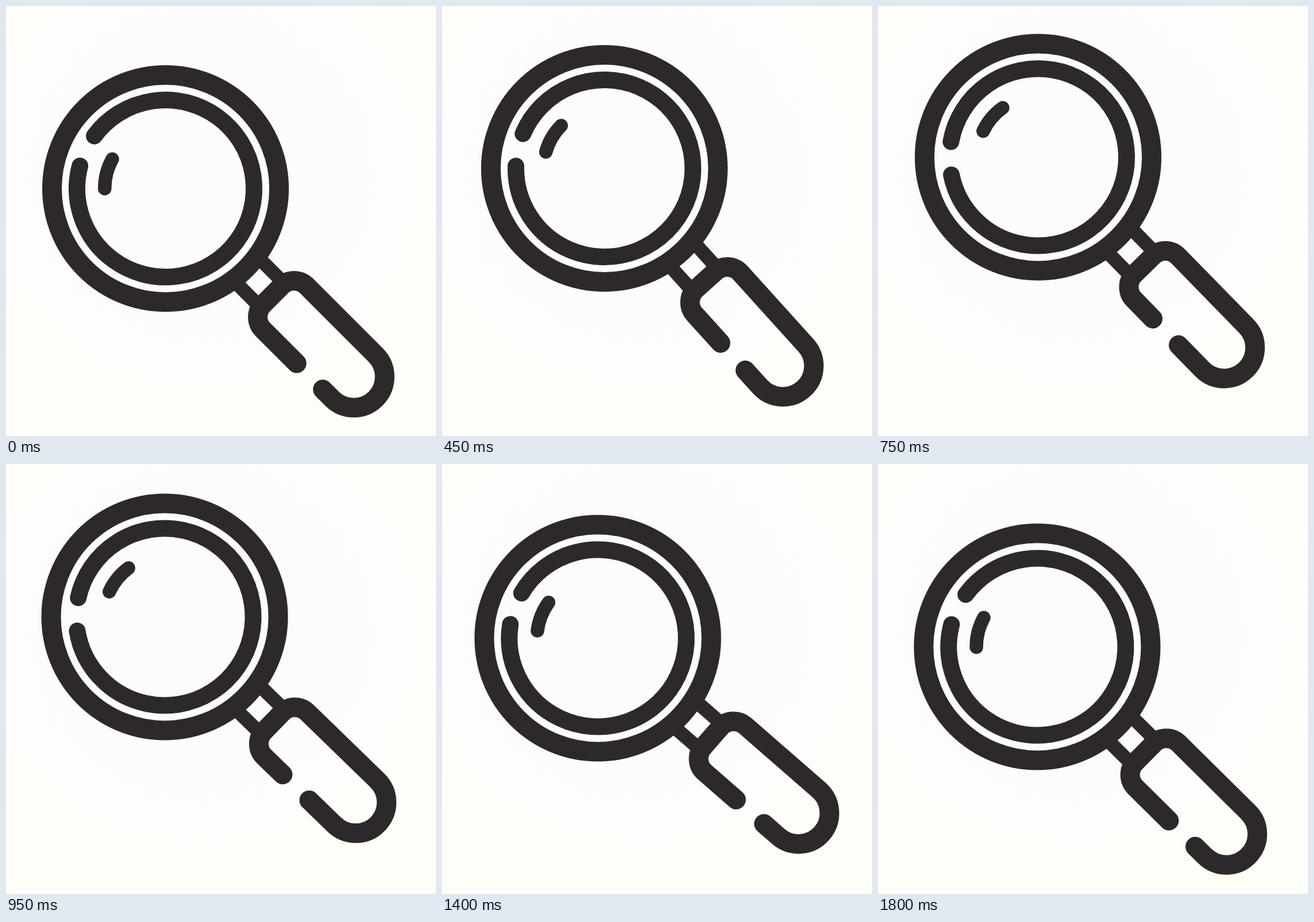
Recreate the animation shown at these times as an HTML page with a canvas. Size 748 px wide and 748 px high, loop 1.85 s.

```html
<!DOCTYPE html>
<html lang="en">
<head>
<meta charset="utf-8">
<title>Magnifying glass</title>
<style>
  html, body { margin: 0; width: 100%; height: 100%; overflow: hidden; }
  body { background: radial-gradient(circle at 340px 290px, #fcfcfe 40%, #fefef8 75%); }
  canvas { display: block; }
</style>
</head>
<body>
<canvas id="stage" width="748" height="748"></canvas>
<script>
const LOOP = 1850, STEP = 50;
const ctx = document.getElementById('stage').getContext('2d');
const rad = deg => deg * Math.PI / 180;

// Poses over one loop: lens centre, handle angle, ring gap, glint and handle gap
const times = [0, 200, 450, 750, 950, 1150, 1400, 1650, 1800];
const tracks = {
  x:     [277.5, 281.8, 282.5, 278.5, 276, 273.7, 271, 273.8, 276.9],
  y:     [317.5, 307.5, 282.5, 263, 266, 281.5, 303, 315.5, 318],
  angle: [45, 47.47, 47.89, 45.66, 44.15, 42.7, 41.06, 43.1, 44.69],
  gap:   [205.6, 205, 192.3, 179.3, 181.7, 190.6, 199.8, 203.7, 205.4],
  glint: [194.4, 199.5, 210.2, 219.9, 219, 212.8, 201.5, 195.5, 194.1],
  slide: [0, -0.7, -15.5, -36, -38, -27, -10.5, -2, -0.6]
};

const count = times.length;
const wrap = i => (i + count) % count;
const timeAt = i => times[wrap(i)] + Math.floor(i / count) * LOOP;

// Smooth periodic curve through the poses
function sample(values, t) {
  const span = i => timeAt(i + 1) - timeAt(i);
  const rate = i => (values[wrap(i + 1)] - values[wrap(i)]) / span(i);
  const slope = i =>
    (rate(i - 1) * span(i) + rate(i) * span(i - 1)) / (span(i - 1) + span(i));
  let i = count - 1;
  while (times[i] > t) i--;
  const h = span(i), p = (t - times[i]) / h, q = 1 - p;
  return values[i] * q * q * (1 + 2 * p) + values[wrap(i + 1)] * p * p * (3 - 2 * p)
    + h * p * q * (slope(i) * q - slope(i + 1) * p);
}

function stroke(width, trace) {
  ctx.lineWidth = width;
  ctx.beginPath();
  trace();
  ctx.stroke();
}

function arc(radius, width, from, to) {
  stroke(width, () => ctx.arc(0, 0, radius, rad(from), rad(to)));
}

function drawHandle(slide) {
  const side = 53.7, near = 262.5, far = 463.2, corner = 31;
  for (const v of [-29.3, 29.3]) {
    stroke(24, () => {
      ctx.moveTo(202, v);
      ctx.lineTo(near, v);
    });
  }
  stroke(34, () => {
    ctx.moveTo(376.3 + slide, side);
    ctx.arcTo(near, side, near, 0, corner);
    ctx.arcTo(near, -side, far, -side, corner);
    ctx.arc(far, 0, side, -Math.PI / 2, Math.PI / 2);
    ctx.lineTo(440.5 + slide, side);
  });
}

function draw(t) {
  const pose = {};
  for (const key in tracks) pose[key] = sample(tracks[key], t);
  ctx.clearRect(0, 0, 748, 748);
  ctx.save();
  ctx.translate(pose.x, pose.y);
  ctx.strokeStyle = '#2d292a';
  ctx.lineCap = 'round';
  arc(197.5, 34, 0, 360);
  arc(154, 29, pose.gap + 10.8, pose.gap + 349.2);
  arc(105.8, 23.5, pose.glint - 14.5, pose.glint + 14.5);
  ctx.rotate(rad(pose.angle));
  ctx.lineCap = 'butt';
  ctx.save();
  // Keep the neck and handle outside the lens
  ctx.beginPath();
  ctx.rect(200, -100, 400, 200);
  ctx.clip();
  ctx.lineCap = 'round';
  drawNeckAndHandle(pose.slide);
  ctx.restore();
  ctx.restore();
}

function drawNeckAndHandle(slide) {
  drawHandle(slide);
}

const start = performance.now();
function tick() {
  const t = (performance.now() - start) % LOOP;
  draw(Math.floor(t / STEP) * STEP);
  requestAnimationFrame(tick);
}
tick();
</script>
</body>
</html>
```
